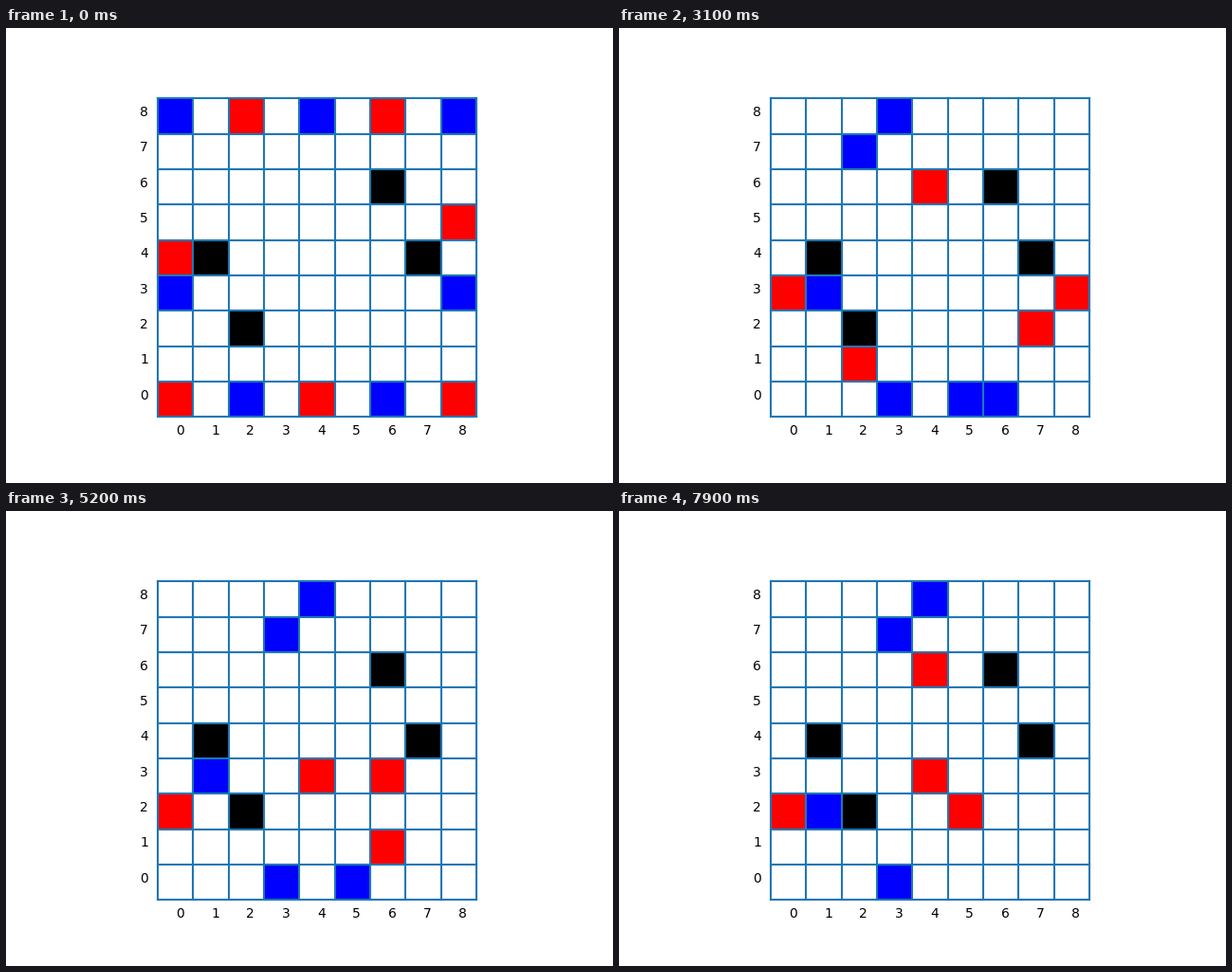
Write a matplotlib script that moves like this. It is 640 by 480 pixels and loops after 8 s.

```python
import matplotlib.pyplot as plt
from itertools import chain, zip_longest
from matplotlib.animation import FuncAnimation
from matplotlib.patches import Rectangle

SIZE = 9
FRAMES = 80
STEP = {"U": (0, 1), "D": (0, -1), "L": (-1, 0), "R": (1, 0)}
WALLS = [(1, 4), (2, 2), (6, 6), (7, 4)]
BLUE = [(0, 8), (4, 8), (8, 8), (0, 3), (8, 3), (2, 0), (6, 0)]
RED = [(2, 8), (6, 8), (0, 4), (8, 5), (0, 0), (4, 0), (8, 0)]

# Each move: column, row, direction. The sides take turns, blue first.
BLUE_MOVES = (
    "20R 60L 83L 73D 72D 71D 70L 08R 18R 88L 78L 28D 68L 58L 03R "
    "48L 27R 37D 36U 38R 50L 40U 41U 60L 42R 52U 50L 40U 41U"
).split() + ["13D", "12U"] * 5 + ["13D"]
RED_MOVES = (
    "85D 80U 84D 81U 28R 68L 00U 01R 58D 57L 38D 11R 47D 82L 04D "
    "03D 72L 21R 46R 62D 56D 55D 83L 54L 44D 73L 61L 63L"
).split() + ["51U", "52D"] * 3 + "51U 43U 44U 45U 53L".split()


def neighbours(cell):
    return [(cell[0] + dx, cell[1] + dy) for dx, dy in STEP.values()]


def play(board, move):
    """Move one piece, then remove rivals touched by two of its side."""
    board = dict(board)
    x, y = int(move[0]), int(move[1])
    dx, dy = STEP[move[2]]
    side = board.pop((x, y))
    target = (x + dx, y + dy)
    board[target] = side
    for cell in neighbours(target):
        if board.get(cell, side) not in (side, "black"):
            if sum(board.get(n) == side for n in neighbours(cell)) >= 2:
                del board[cell]
    return board


board = {c: "black" for c in WALLS}
board.update({c: "blue" for c in BLUE})
board.update({c: "red" for c in RED})
boards = [board]
for move in chain.from_iterable(zip_longest(BLUE_MOVES, RED_MOVES)):
    if move:
        boards.append(play(boards[-1], move))

fig, ax = plt.subplots(figsize=(6.4, 4.8), dpi=100)
for i in range(SIZE + 1):
    ax.plot([i, i], [0, SIZE], color="#1f77b4", lw=1.5)
    ax.plot([0, SIZE], [i, i], color="#1f77b4", lw=1.5)
for i in range(SIZE):
    ax.text(i + 0.5, -0.5, str(i), fontsize=10)
    ax.text(-0.5, i + 0.5, str(i), fontsize=10)
ax.set_xlim(-0.45, SIZE + 0.45)
ax.set_ylim(-0.45, SIZE + 0.45)
ax.set_aspect("equal")
ax.axis("off")

cells = {}
for x in range(SIZE):
    for y in range(SIZE):
        cells[x, y] = ax.add_patch(Rectangle((x, y), 1, 1, lw=0, visible=False))


def draw(frame):
    for pos, rect in cells.items():
        color = boards[frame].get(pos)
        rect.set_visible(color is not None)
        if color:
            rect.set_facecolor(color)
    return list(cells.values())


anim = FuncAnimation(fig, draw, frames=FRAMES, interval=100, repeat=True,
                     repeat_delay=0, blit=False)
plt.show()
```
